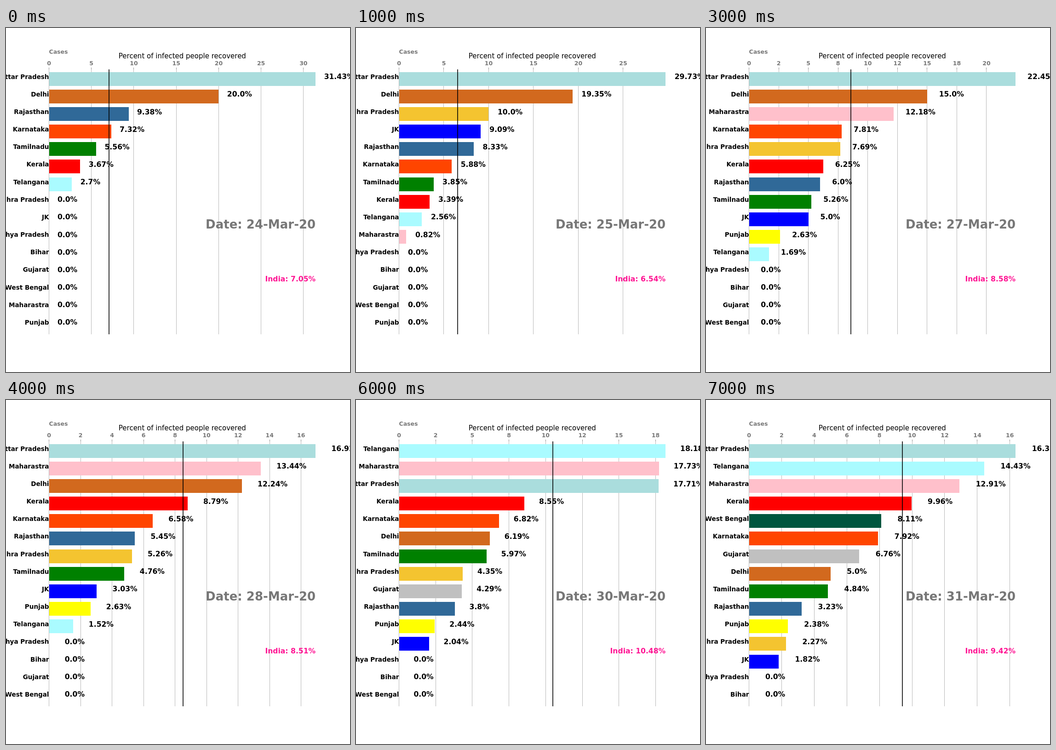
Animation, 748 px wide and 748 px high, one loop 8 s. Source, as an HTML page with a canvas:

```html
<!DOCTYPE html>
<html lang="en">
<head>
<meta charset="utf-8">
<title>Percent of infected people recovered</title>
<style>
  html, body { margin: 0; width: 100%; height: 100%; overflow: hidden; background: #fff; }
  canvas { display: block; }
</style>
</head>
<body>
<canvas id="chart" width="748" height="748"></canvas>
<script>
const ctx = document.getElementById('chart').getContext('2d');

const STEP = 1000;
const FIRST_DAY = 24;
const PT = 75 / 72;
const LEFT = 93.5, RIGHT = 673.2, TOP = 90, BOTTOM = 666;
const ROW = 38.15;

// Daily recovery percentage; the order also breaks ties.
const states = [
  ['Uttar Pradesh', '#aadddd', [31.43, 29.73, 26.19, 22.45, 16.92, 15.28, 17.71, 16.35]],
  ['Delhi', '#d2691e', [20, 19.35, 16.67, 15, 12.24, 8.33, 6.19, 5]],
  ['Rajasthan', '#306998', [9.38, 8.33, 7.5, 6, 5.45, 5.08, 3.8, 3.23]],
  ['Karnataka', '#ff4500', [7.32, 5.88, 5.45, 7.81, 6.58, 6.02, 6.82, 7.92]],
  ['Tamilnadu', '#008000', [5.56, 3.85, 3.45, 5.26, 4.76, 4, 5.97, 4.84]],
  ['Kerala', '#ff0000', [3.67, 3.39, 8.03, 6.25, 8.79, 7.92, 8.55, 9.96]],
  ['Telangana', '#aafbff', [2.7, 2.56, 2.27, 1.69, 1.52, 1.43, 18.18, 14.43]],
  ['Andhra Pradesh', '#f4c430', [0, 10, 9.09, 7.69, 5.26, 4.76, 4.35, 2.27]],
  ['JK', '#0000ff', [0, 9.09, 7.14, 5, 3.03, 2.63, 2.04, 1.82]],
  ['Madhya Pradesh', '#800080', []],
  ['Bihar', '#808000', []],
  ['Gujarat', '#c0c0c0', [0, 0, 0, 0, 0, 1.59, 4.29, 6.76]],
  ['West Bengal', '#00563f', [0, 0, 0, 0, 0, 0, 0, 8.11]],
  ['Maharastra', '#ffc0cb', [0, 0.82, 0.8, 12.18, 13.44, 12.32, 17.73, 12.91]],
  ['Punjab', '#ffff00', [0, 0, 0, 2.63, 2.63, 2.63, 2.44, 2.38]]
];
const india = [7.05, 6.54, 6.93, 8.58, 8.51, 7.9, 10.48, 9.42];

const percent = v => (Number.isInteger(v) ? v.toFixed(1) : v) + '%';

function rect(x0, y0, x1, y1, color) {
  ctx.fillStyle = color;
  ctx.fillRect(x0, y0, x1 - x0, y1 - y0);
}

function text(str, x, y, pt, { color = '#000', align = 'left', weight = 'bold' } = {}) {
  ctx.font = `${weight} ${pt * PT}px "DejaVu Sans", sans-serif`;
  ctx.fillStyle = color;
  ctx.textAlign = align;
  ctx.fillText(str, x, y);
}

// Round half to even for the axis labels.
function roundEven(v) {
  const low = Math.floor(v);
  return v - low === 0.5 ? low + low % 2 : Math.round(v);
}

function drawAxis(max, toX) {
  const step = [1, 2, 2.5, 5, 10].find(s => max / s <= 9);
  for (let v = 0; v <= max; v += step) {
    const x = Math.floor(toX(v));
    rect(x, TOP, x + 1, BOTTOM, '#b8b8b8');
    rect(x, TOP - 4, x + 1, TOP, '#909090');
    text(roundEven(v), toX(v), 80.5, 12, { color: '#777', align: 'center' });
  }
}

function drawRow({ name, color, value }, i, toX) {
  const y = i * ROW;
  if (value) {
    rect(94, Math.round(95.7 + y), Math.round(toX(value)), Math.round(125.7 + y), color);
  }
  text(name, LEFT, Math.round(110.7 + y), 13, { align: 'right' });
}

function draw(day) {
  const rows = states
    .map(([name, color, values]) => ({ name, color, value: values[day] || 0 }))
    .sort((a, b) => b.value - a.value);
  const max = rows[0].value;
  const toX = v => LEFT + v * (RIGHT - LEFT) / max;

  rect(0, 0, 748, 748, '#fff');
  drawAxis(max, toX);
  rows.forEach((row, i) => drawRow(row, i, toX));

  const mean = Math.round(toX(india[day]));
  rect(mean - 0.8, TOP, mean + 0.8, BOTTOM, '#000');

  rows.forEach(({ value }, i) =>
    text(percent(value), toX(value + 1), Math.round(111.2 + i * ROW), 15));

  text('Cases', LEFT, 56, 12, { color: '#777' });
  text('Percent of infected people recovered', (LEFT + RIGHT) / 2, 66, 14.4,
    { align: 'center', weight: 'normal' });
  text(`Date: ${FIRST_DAY + day}-Mar-20`, RIGHT, 436, 25, { color: '#777', align: 'right' });
  text(`India: ${india[day]}%`, RIGHT, 551, 15, { color: '#ff1493', align: 'right' });
}

let start = null, shown = -1;
function tick(now) {
  start ??= now;
  const day = Math.floor((now - start) / STEP) % india.length;
  if (day !== shown) draw(shown = day);
  requestAnimationFrame(tick);
}
draw(shown = 0);
requestAnimationFrame(tick);
</script>
</body>
</html>
```
